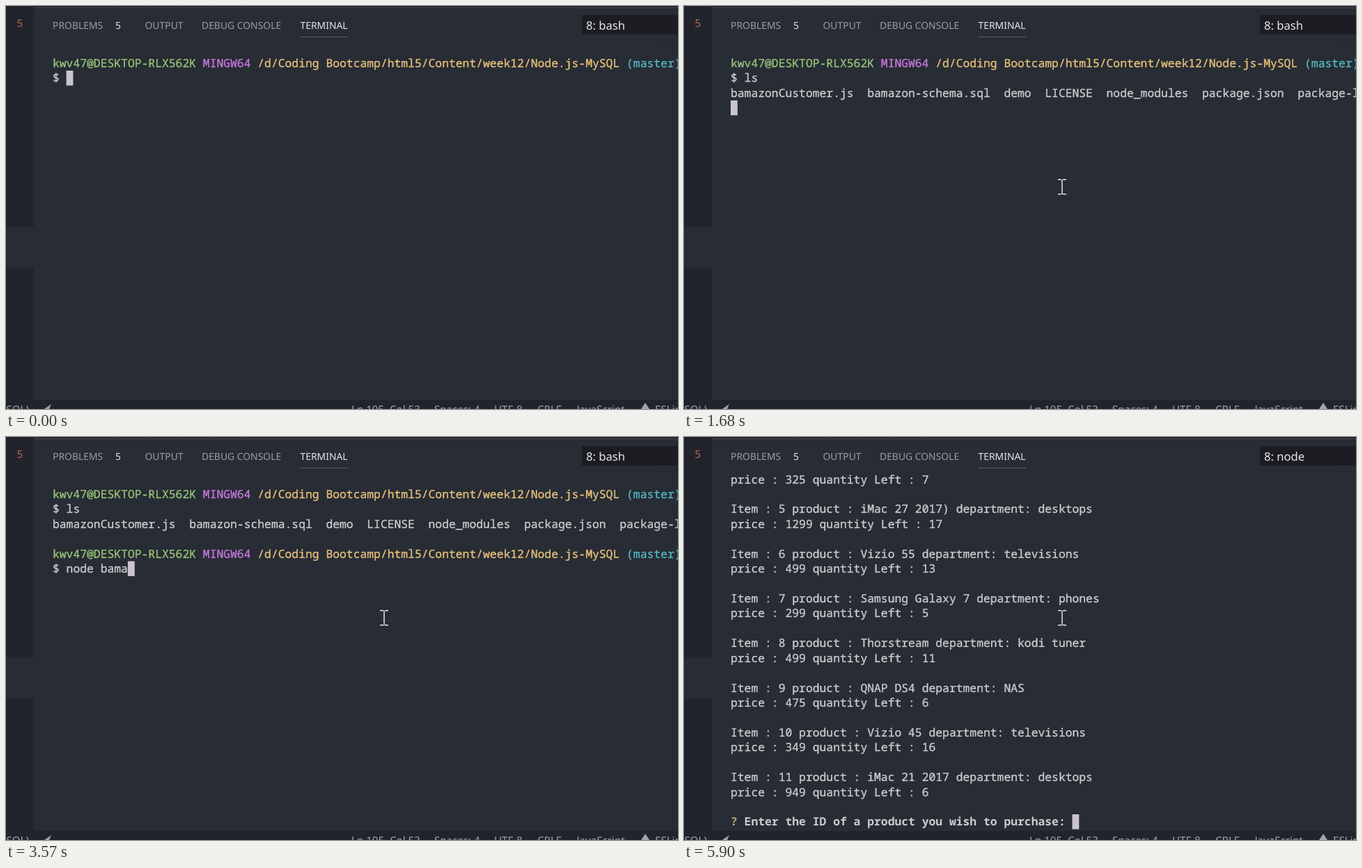
An HTML page with a canvas that plays this animation: 965 by 580 pixels, repeating every 8000 ms.

```html
<!DOCTYPE html>
<html lang="en">
<head>
<meta charset="utf-8">
<title>Terminal session</title>
<style>
  html, body { margin: 0; width: 100%; height: 100%; overflow: hidden; background: #282c34; }
  canvas { display: block; width: 965px; height: 580px; }
</style>
</head>
<body>
<canvas id="stage" width="965" height="580"></canvas>
<script>
const ctx = document.getElementById('stage').getContext('2d');
const LOOP = 8000;
const CELL = 9.81, ROW = 21.43, LEFT = 67, TOP = 71.6;
const MONO = '16.35px "Noto Sans Mono", monospace';
const UI = '"Noto Sans", "Open Sans", sans-serif';
const BG = '#282c34', DARK = '#21252b';
const FG = '#cbcccd', GREEN = '#98c379', PURPLE = '#c678dd', YELLOW = '#e5c07b', CYAN = '#56b6c2';

const PROMPT = [
  [0, 'kwv47@DESKTOP-RLX562K', GREEN],
  [22, 'MINGW64', PURPLE],
  [30, '/d/Coding Bootcamp/html5/Content/week12/Node.js-MySQL', YELLOW],
  [84, '(master)', CYAN]
];
const FILES = 'bamazonCustomer.js  bamazon-schema.sql  demo  LICENSE  node_modules  package.json  package-lock.json';
const ITEMS = [
  [5, 'iMac 27 2017)', 'desktops', 1299, 17],
  [6, 'Vizio 55', 'televisions', 499, 13],
  [7, 'Samsung Galaxy 7', 'phones', 299, 5],
  [8, 'Thorstream', 'kodi tuner', 499, 11],
  [9, 'QNAP DS4', 'NAS', 475, 6],
  [10, 'Vizio 45', 'televisions', 349, 16],
  [11, 'iMac 21 2017', 'desktops', 949, 6]
];
const QUESTION = 'Enter the ID of a product you wish to purchase: ';

// [time, text on the command line]
const LIST_KEYS = [[0, ''], [1370, 'l'], [1530, 'ls']];
const NODE_KEYS = [
  [1850, ''], [2260, 'n'], [2330, 'no'], [2390, 'nod'], [2620, 'node'], [2690, 'node '],
  [3240, 'node b'], [3320, 'node ba'], [3480, 'node bam'], [3570, 'node bama'],
  [4100, 'node bamazon'], [4650, 'node bamazonC'], [5030, 'node bamazonCustomer.js ']
];

function rect(x, y, w, h, color) {
  ctx.fillStyle = color;
  ctx.fillRect(x, y, w, h);
}

function poly(color, ...points) {
  ctx.fillStyle = color;
  ctx.beginPath();
  points.forEach(p => ctx.lineTo(...p));
  ctx.fill();
}

function label(text, x, y, size, color) {
  ctx.font = size + 'px ' + UI;
  ctx.letterSpacing = '0px';
  ctx.fillStyle = color;
  ctx.fillText(text, x, y);
}

function print(row, col, text, color = FG, weight = 'normal') {
  const x = LEFT + col * CELL, y = Math.round(TOP + row * ROW + 16.4);
  ctx.font = weight + ' ' + MONO;
  ctx.letterSpacing = '0px';
  ctx.letterSpacing = (CELL - ctx.measureText('0'.repeat(20)).width / 20).toFixed(4) + 'px';
  ctx.fillStyle = ctx.strokeStyle = color;
  ctx.fillText(text, x, y);
  // a hairline outline gives the regular weight its sturdier stems
  if (weight === 'normal') {
    ctx.lineWidth = 0.35;
    ctx.lineJoin = 'round';
    ctx.strokeText(text, x, y);
  }
}

function block(row, col) {
  rect(LEFT + col * CELL, TOP + row * ROW, CELL, ROW, '#c9c5cb');
}

function typed(keys, t) {
  let text = '';
  for (const [at, value] of keys) if (t >= at) text = value;
  return text;
}

function prompt(row, keys, t, enter) {
  PROMPT.forEach(([col, text, color]) => print(row, col, text, color));
  const command = typed(keys, t);
  print(row + 1, 0, '$ ' + command);
  if (t < enter) block(row + 1, 2 + command.length);
}

function shell(t) {
  prompt(0, LIST_KEYS, t, 1600);
  if (t >= 1680) print(2, 0, FILES);
  if (t >= 1850) prompt(4, NODE_KEYS, t, 5350);
  if (t >= 5350) block(6, 0);
  else if (t >= 1600 && t < 1850) block(t < 1680 ? 2 : 3, 0);
}

function stock() {
  print(-1, 0, 'price : 325 quantity Left : 7');
  ITEMS.forEach(([id, name, department, price, left], i) => {
    print(1 + i * 3, 0, `Item : ${id} product : ${name} department: ${department}`);
    print(2 + i * 3, 0, `price : ${price} quantity Left : ${left}`);
  });
  print(22, 0, '?', '#b0a868', 'bold');
  print(22, 2, QUESTION, FG, 'bold');
  block(22, 2 + QUESTION.length);
}

function frame(t) {
  rect(0, 0, 965, 580, BG);
  rect(0, 0, 40, 580, DARK);
  rect(0, 318, 40, 58, BG);
  rect(40, 0, 925, 2, DARK);
  [157, 204, 251, 299, 345].forEach(x => rect(x, 0, 1, 1, '#4a4e55'));
  rect(40, 2, 925, 1, '#474a50');
  label('5', 15.5, 30, 15, '#bd6850');

  label('PROBLEMS', 67, 33, 13.9, '#9a9da2');
  label('5', 157, 33, 13.9, '#e6e6e7');
  label('OUTPUT', 199.5, 33, 13.9, '#9a9da2');
  label('DEBUG CONSOLE', 281, 33, 13.9, '#9a9da2');
  label('TERMINAL', 422.5, 33, 13.9, '#e6e6e7');
  rect(422, 44, 69, 1, '#5a5e66');
  rect(827, 13, 138, 28, '#1b1d23');
  label(t < 5430 ? '8: bash' : '8: node', 833, 34, 16.6, '#e8e8e8');
  rect(937, 49, 28, 1, '#23272e');
}

function statusBar() {
  const color = '#9da5b4';
  rect(0, 567, 965, 13, DARK);
  [['SQL)', 0.5], ['Ln 105, Col 53', 496], ['Spaces: 4', 615], ['UTF-8', 701],
   ['CRLF', 763], ['JavaScript', 819.5], ['ESLint', 932]
  ].forEach(([text, x]) => label(text, x, 586, 15.1, color));
  poly(color, [65, 573], [62, 580], [55, 580]);
  poly(color, [918, 571], [924, 580], [912, 580]);
}

function easeOutBack(u, s) {
  const v = u - 1;
  return 1 + (s + 1) * v ** 3 + s * v ** 2;
}

function pointer(t) {
  if (t < 70) return;
  const u = Math.min(8, Math.floor((t - 70) / 75)) / 8;
  const x = Math.round(833 - 290 * easeOutBack(u, 1.1));
  const y = Math.round(552 - 292 * easeOutBack(u, 0.68));
  const color = '#e4e5e6';
  rect(x - 0.75, y - 10, 1.5, 21, color);
  for (const dy of [-11, 10]) {
    rect(x - 6, y + dy, 5, 1.5, color);
    rect(x + 1, y + dy, 5, 1.5, color);
  }
}

function draw(t) {
  ctx.textRendering = 'geometricPrecision';
  frame(t);
  if (t < 5900) shell(t);
  else stock();
  statusBar();
  pointer(t);
}

const start = performance.now();
function tick() {
  draw((performance.now() - start) % LOOP);
  requestAnimationFrame(tick);
}
tick();
</script>
</body>
</html>
```
